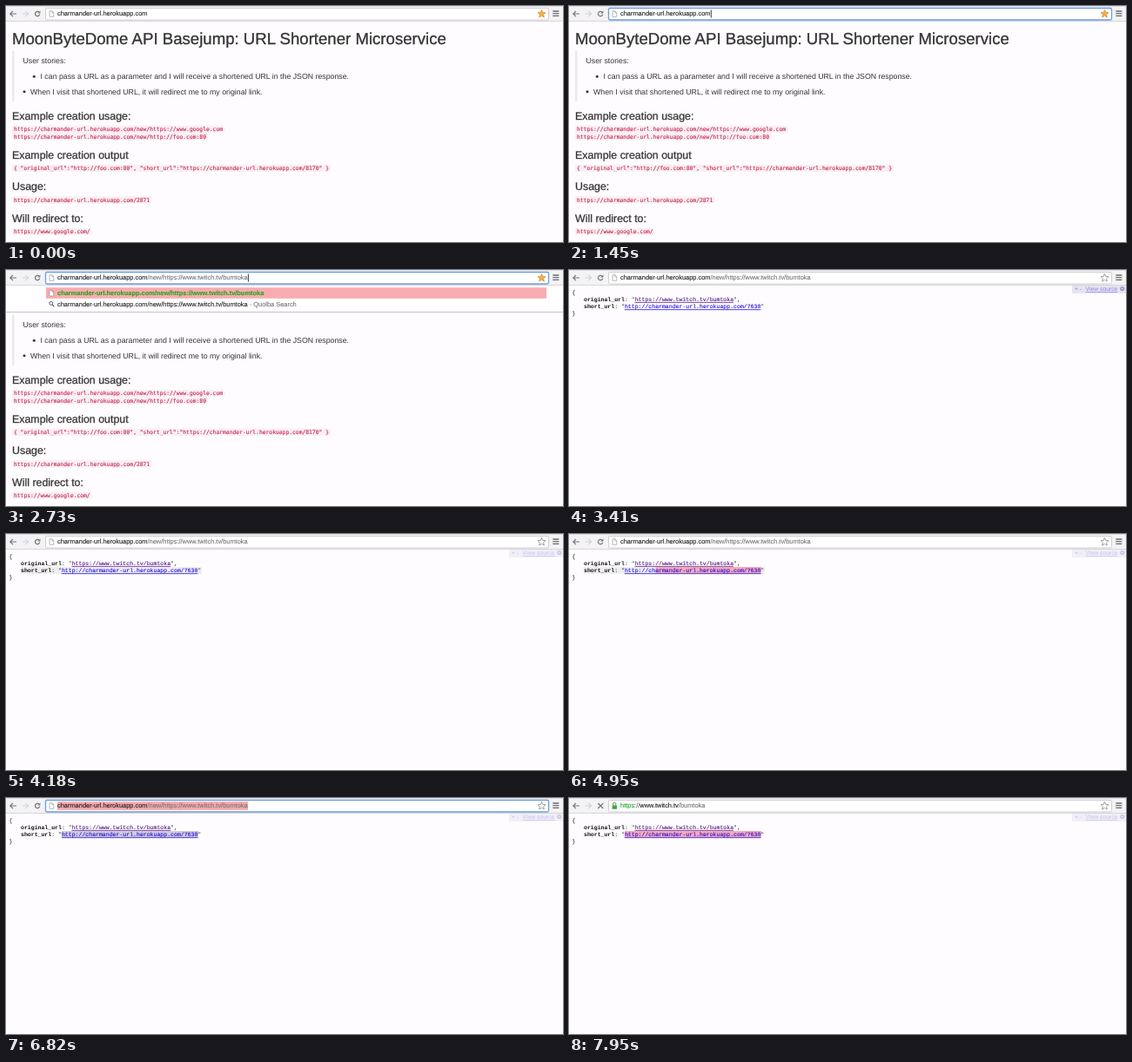
An HTML page that plays this animation: 640 px wide and 272 px high, repeating every 8 s.

```html
<!DOCTYPE html>
<html lang="en">
<head>
<meta charset="utf-8">
<title>URL shortener demo</title>
<style>
  html, body { margin: 0; width: 100%; height: 100%; overflow: hidden; background: #fefcfe; }
  svg { display: block; width: 640px; height: 272px; }
  text { font-family: "Liberation Sans", Arial, sans-serif; white-space: pre; text-rendering: geometricPrecision; fill: #333; }
  .h1 { font-size: 18.63px; stroke: #333; stroke-width: .3px; }
  .h3 { font-size: 12.4px; stroke: #333; stroke-width: .25px; }
  .body { font-size: 8.78px; }
  .code { font: 6.33px "DejaVu Sans Mono", monospace; fill: #c7254e; stroke: #c7254e; stroke-width: .12px; }
  .json { font: 6.53px "Liberation Mono", "Courier New", monospace; fill: #222; }
  .key { font-weight: bold; fill: #111; }
  .quote { fill: #0b7500; }
  .link { fill: #2212e0; stroke: #2212e0; stroke-width: .12px; text-decoration: underline; text-decoration-thickness: .8px; }
  .visited { fill: #551a8b; stroke: #551a8b; }
  .ui { font-size: 7.43px; fill: #222; stroke: #222; stroke-width: .12px; }
  .dim { fill: #777; stroke: #777; }
  .match { fill: #1fa51f; stroke: #1fa51f; }
  .strong { font-weight: bold; }
  .tool { font-size: 6.8px; fill: #8a83ec; }
  .line { fill: none; stroke: #777; stroke-width: 1.2; }
</style>
</head>
<body>
<svg viewBox="0 0 640 272">
  <defs>
    <path id="file" d="M-2.3 -3.2H.8L2.4 -1.5V3.3H-2.3ZM.7 -3.1V-1.4H2.3" fill="#fff" stroke="#999" stroke-width=".7"/>
    <g id="lens" fill="none" stroke="#555">
      <circle cx="-.6" cy="-.8" r="1.9"/><path d="M.9 .8L3 3" stroke-width="1.3"/>
    </g>
  </defs>
  <rect width="640" height="272" fill="#fefcfe"/>
  <g id="home"></g>

  <g id="result">
    <rect id="hover" x="17" y="38" width="208" height="8" fill="#efedf0"/>
    <rect id="selection" y="38" height="7.7"/>
    <text class="json" x="3.5" y="28">{</text>
    <text class="json" x="17" y="36"><tspan class="key">original_url</tspan>: <tspan class="quote">"</tspan><tspan class="link visited">https://www.twitch.tv/bumtoka</tspan><tspan class="quote">"</tspan>,</text>
    <text class="json" x="17" y="44.4"><tspan class="key">short_url</tspan>: <tspan class="quote">"</tspan><tspan class="link">http://charmander-url.herokuapp.com/7630</tspan><tspan class="quote">"</tspan></text>
    <text class="json" x="3.5" y="52.4">}</text>
    <g id="tools">
      <rect x="578" y="17" width="62" height="10" fill="#e6e3f1"/>
      <text class="tool" x="581" y="24">+ -</text>
      <text class="tool" x="593.5" y="24" text-decoration="underline">View source</text>
      <circle cx="635.7" cy="21.5" r="1.8" fill="#d5d2ea" stroke="#9a97c0" stroke-width="1.5"/>
    </g>
  </g>

  <g id="menu">
    <rect id="menuBack" y="17" width="640" fill="#fff"/>
    <rect id="menuEdge" width="640" height="1" fill="#c4c3c5"/>
    <rect x="46" y="20.2" width="575" height="12.6" fill="#f8acaf"/>
    <g id="rows"></g>
  </g>

  <rect width="640" height="17.5" fill="#f3f2f4"/>
  <rect width="640" height=".8" fill="#dbdadc"/>
  <rect y="17" width="640" height=".8" fill="#d0cfd1"/>
  <path class="line" d="M12 9H5M8 5.8L4.8 9L8 12.2"/>
  <path class="line" d="M18.5 9H25.5M22.4 5.8L25.6 9L22.4 12.2" style="stroke:#d4d3d5"/>
  <g id="reload">
    <path class="line" d="M38.2 7.2A2.7 2.7 0 1 0 38.8 9.6"/><path d="M39.4 5.6V8.6H36.4Z" fill="#777"/>
  </g>
  <path id="stop" class="line" d="M33.3 6L39.3 12M39.3 6L33.3 12"/>
  <rect id="field" x="45.5" y="2.5" width="578" height="13.5" rx="1.5" fill="#fff"/>
  <use id="fileIcon" href="#file" x="52.3" y="9"/>
  <g id="lock">
    <rect x="49.6" y="8.4" width="5.4" height="4.4" rx=".6" fill="#45a345"/>
    <path d="M50.7 8.5V7a1.6 1.6 0 0 1 3.2 0V8.5" fill="none" stroke="#45a345"/>
  </g>
  <rect id="urlSelection" x="59" y="4.3" height="9.6" fill="#f5a8ac"/>
  <text class="ui" x="59" y="11.4" id="url"></text>
  <rect id="caret" y="4.6" width=".8" height="9" fill="#111"/>
  <path id="star" d="M615.5 4.4L616.8 7.4L620 7.7L617.6 9.8L618.3 13L615.5 11.3L612.7 13L613.4 9.8L611 7.7L614.2 7.4Z" stroke-width=".8"/>
  <path d="M628.3 6H635.3M628.3 8.7H635.3M628.3 11.4H635.3" stroke="#6a6a6a" stroke-width="1.3"/>
</svg>
<script>
const $ = id => document.getElementById(id);
const DURATION = 8000;
const HOST = "charmander-url.herokuapp.com";
const CHANNEL = "https://www.twitch.tv/bumtoka";
const span = (cls, text) => `<tspan class="${cls}">${text}</tspan>`;
const text = (cls, x, y, content) => `<text class="${cls}" x="${x}" y="${y}">${content}</text>`;
const show = (id, on) => { $(id).style.display = on ? "" : "none"; };
const set = (id, attrs) => { for (const k in attrs) $(id).setAttribute(k, attrs[k]); };
const between = (t, a, b) => t >= a && t < b;
const clamp = v => Math.min(1, Math.max(0, v));

function codeLine(y, content) {
  const width = content.length * 6.33 * .602 + 4;
  return `<rect x="7" y="${y - 6.4}" width="${width}" height="8.2" rx="2" fill="#f9eff4"/>` + text("code", 9, y, content);
}

$("home").innerHTML =
  text("h1", 7, 44.2, "MoonByteDome API Basejump: URL Shortener Microservice") +
  '<rect x="7" y="52" width="2.5" height="57.5" fill="#ebe9eb"/>' +
  text("body", 19.5, 66.3, "User stories:") +
  '<circle cx="32.3" cy="81.3" r="1.5" fill="#333"/>' +
  text("body", 39.5, 84, "I can pass a URL as a parameter and I will receive a shortened URL in the JSON response.") +
  '<circle cx="21" cy="98.8" r="1.5" fill="#333"/>' +
  text("body", 28, 101.5, "When I visit that shortened URL, it will redirect me to my original link.") +
  text("h3", 7, 130.6, "Example creation usage:") +
  codeLine(144.2, `https://${HOST}/new/https://www.google.com`) +
  codeLine(152.7, `https://${HOST}/new/http://foo.com:80`) +
  text("h3", 7, 175.5, "Example creation output") +
  codeLine(189.2, `{ "original_url":"http://foo.com:80", "short_url":"https://${HOST}/8170" }`) +
  text("h3", 7, 212.2, "Usage:") +
  codeLine(225.7, `https://${HOST}/2871`) +
  text("h3", 7, 248.7, "Will redirect to:") +
  codeLine(262.2, "https://www.google.com/");

// Address bar: start time, leading dim part, dark part, dim path
const addresses = [
  [0, "", HOST, ""],
  [1600, "", HOST, "/"],
  [1780, "", HOST, "/n"],
  [1900, "", HOST, "/ne"],
  [2020, "", HOST, "/new"],
  [2360, "", HOST, "/new/"],
  [2600, "", HOST, "/new/" + CHANNEL],
  [7200, "http://", HOST, "/7630"],
  [7600, "", HOST, "/7630"],
  [7820, span("match", "https") + "://", "www.twitch.tv", "/bumtoka"],
];

// Suggestion list: start, end, typed path, further completions
const sites = ["/https://www.google.com", "/https://www.netflix.com",
  "/https://www.tristanPebbleyard.com", "/maplestory" + span("strong", ".com")];
const menus = [
  [1600, 2600, HOST + "/new", sites],
  [2600, 2860, HOST + "/new/" + CHANNEL, []],
  [7200, 7600, HOST + "/7630", []],
];

function fillMenu([, , typed, more]) {
  const bold = span("match strong", typed);
  const lines = [bold, ...more.map(m => bold + span("match", m)), typed + span("dim", " - Quolba Search")];
  $("rows").innerHTML = lines.map((line, i) => {
    const y = 26.6 + i * 12.5;
    const icon = i === lines.length - 1 ? "lens" : "file";
    return `<use href="#${icon}" x="52.3" y="${y}"/>` + text("ui", 59, y + 2.6, line);
  }).join("");
  const bottom = 23 + lines.length * 12.5;
  set("menuBack", { height: bottom - 17 });
  set("menuEdge", { y: bottom });
}

let shownAddress, shownMenu, urlWidth = 0;

function draw(t) {
  const address = addresses.filter(a => a[0] <= t).pop();
  if (address !== shownAddress) {
    shownAddress = address;
    $("url").innerHTML = span("dim", address[1]) + address[2] + span("dim", address[3]);
    urlWidth = $("url").getComputedTextLength();
  }
  const menu = menus.find(m => between(t, m[0], m[1]));
  if (menu && menu !== shownMenu) fillMenu(menu);
  shownMenu = menu;
  show("menu", menu);

  const loaded = t >= 3050;
  show("home", !loaded);
  show("result", loaded);

  const focused = between(t, 1000, 2860) || between(t, 6700, 7600);
  const allSelected = between(t, 1000, 1300) || between(t, 6700, 7200);
  set("field", { stroke: focused ? "#6a9fdc" : "#c6c5c7", "stroke-width": focused ? 1.3 : .8 });
  show("urlSelection", allSelected);
  set("urlSelection", { width: urlWidth + .5 });
  show("caret", focused && !allSelected);
  set("caret", { x: 59.3 + urlWidth });

  const loading = between(t, 2860, 3050) || t >= 7600;
  show("reload", !loading);
  show("stop", loading);
  const secure = t >= 7820;
  show("lock", secure);
  show("fileIcon", !secure);
  set("star", loaded ? { fill: "#fff", stroke: "#8a8a8a" } : { fill: "#f3b04a", stroke: "#d49334" });

  // The link is selected backwards, one letter at a time
  const letters = Math.round(40 * clamp((t - 4300) / 840));
  set("selection", {
    x: 221 - letters * 3.92,
    width: letters * 3.92,
    fill: between(t, 6700, 7600) ? "#d0ccd8" : "#f8a9b4",
  });
  show("hover", between(t, 4150, 6500));
  set("tools", { opacity: 1 - .5 * clamp((t - 3440) / 300) });
}

const start = performance.now();
function tick() {
  draw((performance.now() - start) % DURATION);
  requestAnimationFrame(tick);
}
tick();
</script>
</body>
</html>
```
